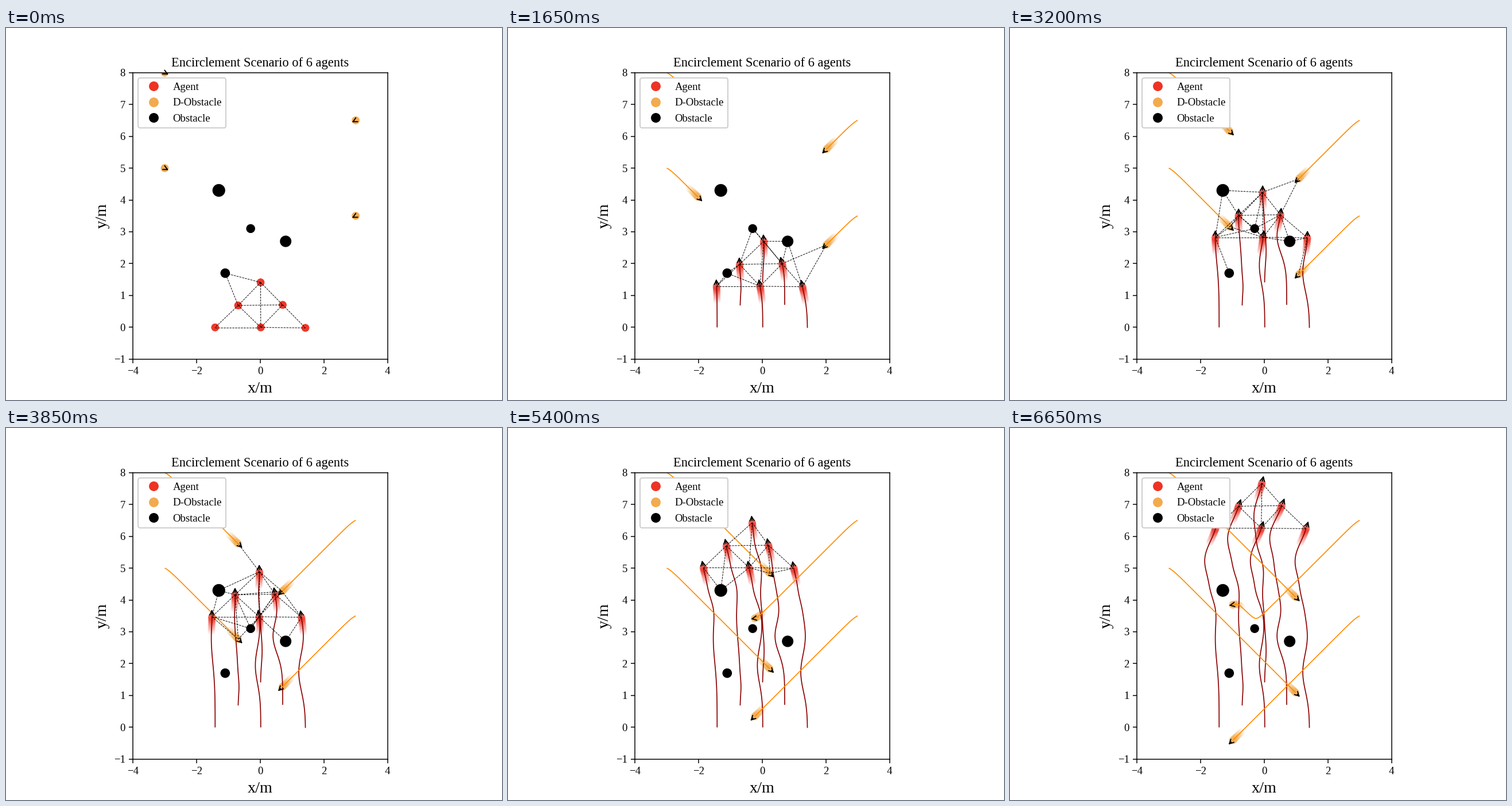
These frames come from a looping animation (864x648 px, 6900 ms). A matplotlib script:

```python
import numpy as np
import matplotlib.pyplot as plt
from matplotlib.animation import FuncAnimation
from matplotlib.collections import EllipseCollection, LineCollection
from matplotlib.colors import to_rgba
from matplotlib.lines import Line2D
from matplotlib.patches import Circle, FancyArrowPatch

plt.rcParams["font.family"] = "Liberation Serif"

DT, STEPS, FRAMES = 0.05, 134, 138
RANGE = 1.51      # sensing distance
TAIL = 10         # ghosts per moving body
RADIUS = 0.12
RED, ORANGE = "#ee3224", "#f2ab4e"

t = np.arange(STEPS) * DT


def lagged(rate, lag, tau):
    """Distance covered while the speed builds up to its full rate."""
    return rate * t - lag * (1 - np.exp(-t / tau))


def bump(x, height, centre, width):
    return height * np.exp(-((x - centre) / width) ** 2)


# Agents climb together; each steers round obstacles, then all sway left
climb = lagged(0.994, 0.35, 0.35)
sway = bump(climb, -0.45, 5.25, 0.85) + bump(climb, -0.13, 4.25, 0.5)
AGENTS = [  # start, dodges as (sideways distance, height climbed, spread)
    ((0.01, 1.41), [(0.05, 1.0, 0.6), (-0.06, 2.8, 0.6), (0.12, 5.3, 0.8)]),
    ((-0.695, 0.685), [(0.03, 0.6, 0.4), (-0.11, 2.8, 1.1)]),
    ((0.707, 0.703), [(-0.3, 2.15, 0.75), (-0.2, 3.6, 0.7), (-0.08, 5.2, 1.4)]),
    ((-1.416, -0.005), [(-0.12, 2.8, 1.1)]),
    ((0.018, -0.005), [(-0.17, 1.95, 0.8), (-0.05, 3.9, 0.6)]),
    ((1.423, -0.02), [(-0.21, 1.75, 0.85), (-0.11, 3.6, 0.65)]),
]
paths = [np.column_stack([x + sway + sum(bump(climb, *d) for d in dodges), y + climb])
         for (x, y), dodges in AGENTS]
N = len(paths)

# Moving obstacles cross diagonally
fall = lagged(0.6, 0.075, 0.23)
for x, y in [(-3, 8), (-3, 5), (3, 6.5), (3, 3.5)]:
    paths.append(np.column_stack([x - np.sign(x) * 0.6 * t, y - fall]))

# The third one turns upward near a fixed obstacle and levels out again
turn = t - 5.43
paths[N + 2][:, 1] += 0.6 * (turn + np.hypot(turn, 0.17))
paths[N + 2][:, 1] -= 0.72 * 0.06 * np.log1p(np.exp((t - 6.36) / 0.06))

paths = np.array(paths)
speed = np.gradient(paths, DT, axis=1)
speed[:N, 0] = 0

FIXED = [(-1.1, 1.7, 0.15), (-1.3, 4.3, 0.2), (-0.3, 3.1, 0.14), (0.8, 2.7, 0.18)]
fixed_xy = np.array(FIXED)[:, :2]

fig, ax = plt.subplots(figsize=(6.4, 4.8), dpi=135)
ax.set_aspect("equal")
ax.set(xlim=(-4, 4), ylim=(-1, 8), xticks=range(-4, 5, 2), yticks=range(-1, 9))
ax.set_title("Encirclement Scenario of 6 agents", fontsize=12)
ax.set_xlabel("x/m", fontsize=15, labelpad=5)
ax.set_ylabel("y/m", fontsize=15)

labels = [("Agent", RED), ("D-Obstacle", ORANGE), ("Obstacle", "black")]
ax.legend(handles=[Line2D([], [], ls="", marker="o", ms=8, color=c, label=s)
                   for s, c in labels],
          loc="upper left", framealpha=1, labelspacing=0.55)

for x, y, r in FIXED:
    ax.add_patch(Circle((x, y), r, color="black", lw=0))

movers = len(paths)
kinds = [RED] * N + [ORANGE] * (movers - N)
fade = 0.08 + 0.5 * np.linspace(0, 1, TAIL) ** 2
size = np.full(movers * TAIL, 2 * RADIUS)
ghosts = EllipseCollection(size, size, 0 * size, units="xy",
                           offsets=np.zeros((len(size), 2)),
                           offset_transform=ax.transData,
                           facecolors=[to_rgba(c, a) for c in kinds for a in fade],
                           edgecolors="none", zorder=1)
trails = LineCollection([], colors=["darkred"] * N + ["darkorange"] * (movers - N),
                        linewidths=0.9, zorder=2)
links = LineCollection([], colors="black", linewidths=0.5, linestyles="--", zorder=2.1)
for item in (ghosts, trails, links):
    ax.add_collection(item, autolim=False)

arrows = []
for _ in paths:
    arrow = FancyArrowPatch((0, 0), (0, 1), arrowstyle="->", mutation_scale=10,
                            shrinkA=2, shrinkB=2, lw=1, color="black", zorder=3)
    ax.add_patch(arrow)
    arrow.set_clip_on(False)
    arrows.append(arrow)


def find_links(now):
    nodes = np.vstack([now, fixed_xy])
    return [(nodes[i], nodes[j]) for i in range(N) for j in range(i + 1, len(nodes))
            if np.hypot(*(nodes[i] - nodes[j])) < RANGE]


def update(frame):
    k = min(frame, STEPS - 1)
    now = paths[:, k]
    recent = np.clip(np.arange(k - TAIL + 1, k + 1), 0, None)
    ghosts.set_offsets(paths[:, recent].reshape(-1, 2))
    trails.set_segments([p[:k + 1] for p in paths])
    links.set_segments(find_links(now))
    for arrow, p, v in zip(arrows, now, speed[:, k]):
        arrow.set_visible(bool(np.any(v)))
        arrow.set_positions(tuple(p), tuple(p + 0.3 * v))
    return [ghosts, trails, links, *arrows]


anim = FuncAnimation(fig, update, frames=FRAMES, interval=50, repeat=True,
                     repeat_delay=0, blit=False)
plt.show()
```
